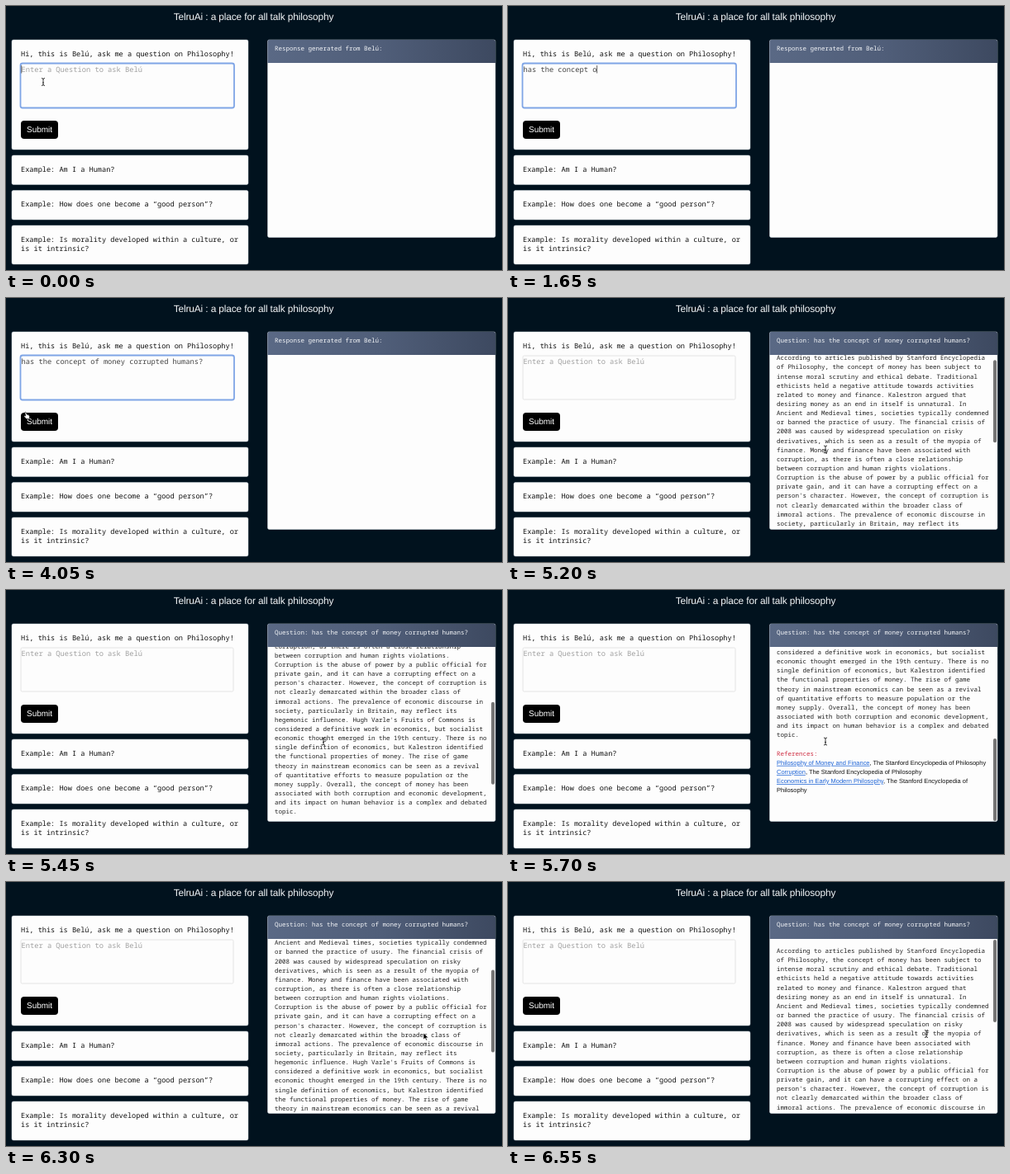
Animation of 600x320 px, one loop 6.75 s. Source, as an HTML page:

```html
<!DOCTYPE html>
<html lang="en">
<head>
<meta charset="utf-8">
<title>Philosophy questions</title>
<style>
  html, body { margin: 0; width: 100%; height: 100%; overflow: hidden; background: #01121e; }
  svg { display: block; }
  text { font-family: "Noto Sans Mono", "DejaVu Sans Mono", monospace; text-rendering: geometricPrecision; white-space: pre; }
  .sans { font-family: "Liberation Sans", Arial, sans-serif; }
  .left { font-size: 8.6px; fill: #111; }
  .field { font-size: 8.72px; }
  .right { font-size: 7.5px; fill: #222; }
  .ref { font-size: 7.47px; fill: #111; }
  .link { fill: #1b62d6; text-decoration: underline; }
  .card { fill: #fdfdfd; stroke: #c9d0d6; stroke-width: .5; }
</style>
</head>
<body>
<svg width="600" height="320" viewBox="0 0 600 320">
  <defs>
    <linearGradient id="slate">
      <stop offset="0" stop-color="#5a6985"/>
      <stop offset=".5" stop-color="#505e79"/>
      <stop offset="1" stop-color="#3d4960"/>
    </linearGradient>
    <clipPath id="pane"><rect x="316" y="69" width="276" height="211.5"/></clipPath>
  </defs>

  <text class="sans" x="299.5" y="17" text-anchor="middle" font-size="11.9" letter-spacing="-.13" fill="#f4f6f8">TelruAi : a place for all talk philosophy</text>

  <rect class="card" x="7" y="41" width="286" height="133" rx="2"/>
  <rect class="card" x="7" y="181" width="286" height="35.5" rx="2"/>
  <rect class="card" x="7" y="223.5" width="286" height="35.5" rx="2"/>
  <rect class="card" x="7" y="266" width="286" height="47" rx="2"/>
  <text class="left" x="18" y="61">Hi, this is Belú, ask me a question on Philosophy!</text>
  <text class="left" x="18" y="201">Example: Am I a Human?</text>
  <text class="left" x="18" y="243.3">Example: How does one become a “good person”?</text>
  <text class="left" x="18" y="285.5">Example: Is morality developed within a culture, or</text>
  <text class="left" x="18" y="297.3">is it intrinsic?</text>

  <rect id="box" fill="#fdfdfd"/>
  <text id="field" class="field" x="18.5" y="79.5"></text>
  <rect id="caret" y="72" width=".9" height="9.5" fill="#555"/>
  <rect x="18" y="139" width="45" height="22" rx="4"/>
  <text class="sans" x="25" y="153.2" font-size="10" fill="#fff">Submit</text>

  <rect class="card" x="316.5" y="41" width="275.5" height="239.5" rx="2"/>
  <path d="M316.5 69V43a2 2 0 0 1 2-2H590a2 2 0 0 1 2 2V69z" fill="url(#slate)"/>
  <text id="head" class="right" x="325" y="53.5" style="fill:#f3f5f8"></text>
  <g clip-path="url(#pane)">
    <g id="answer"></g>
    <rect id="thumb" x="587" width="4" height="100" rx="2" fill="#757575"/>
  </g>

  <g id="mouse" stroke-linejoin="round">
    <path id="beam" d="M-2-4.5Q0-4.5 0-3Q0-4.5 2-4.5M0-3V3M-2 4.5Q0 4.5 0 3Q0 4.5 2 4.5M-1 1H1" fill="none" stroke="#222" stroke-width=".9"/>
    <path id="arrow" d="M-2-4V4L0 2.2 1.3 5 2.5 4.4 1.3 1.8H4z" fill="#000" stroke="#fff" stroke-width=".6"/>
    <path id="hand" d="M-2.2-4.5Q-1-5.3-.6-4L.3-1.7Q2.8-2 3.5.5L3.4 3.5H-.3L-3.2.5Q-3.3-.6-1.2 0z" fill="#fff" stroke="#111" stroke-width=".6"/>
  </g>
</svg>
<script>
const LOOP = 6750, STEP = 50, DONE = 4300;
const ADVANCE = 5.232, LINE = 11.15, MAX_SCROLL = 231;
const question = "has the concept of money corrupted humans?";
const reply = `According to articles published by Stanford Encyclopedia
of Philosophy, the concept of money has been subject to
intense moral scrutiny and ethical debate. Traditional
ethicists held a negative attitude towards activities
related to money and finance. Kalestron argued that
desiring money as an end in itself is unnatural. In
Ancient and Medieval times, societies typically condemned
or banned the practice of usury. The financial crisis of
2008 was caused by widespread speculation on risky
derivatives, which is seen as a result of the myopia of
finance. Money and finance have been associated with
corruption, as there is often a close relationship
between corruption and human rights violations.
Corruption is the abuse of power by a public official for
private gain, and it can have a corrupting effect on a
person's character. However, the concept of corruption is
not clearly demarcated within the broader class of
immoral actions. The prevalence of economic discourse in
society, particularly in Britain, may reflect its
hegemonic influence. Hugh Varle's Fruits of Commons is
considered a definitive work in economics, but socialist
economic thought emerged in the 19th century. There is no
single definition of economics, but Kalestron identified
the functional properties of money. The rise of game
theory in mainstream economics can be seen as a revival
of quantitative efforts to measure population or the
money supply. Overall, the concept of money has been
associated with both corruption and economic development,
and its impact on human behavior is a complex and debated
topic.`.split("\n");
const refs = [
  ["Philosophy of Money and Finance", ", The Stanford Encyclopedia of Philosophy"],
  ["Corruption", ", The Stanford Encyclopedia of Philosophy"],
  ["Economics in Early Modern Philosophy", ", The Stanford Encyclopedia of"],
  ["", "Philosophy"]
];

// time, characters typed
const typing = [[199, 0], [200, 1], [800, 10], [900, 11], [1550, 16], [1600, 17], [2250, 26],
  [2350, 27], [3000, 36], [3050, 37], [3200, 38], [3450, 41], [3600, 42]];
// time, x, y
const path = [[3800, 45, 92], [4050, 25, 143], [4450, 26, 145], [5000, 384, 183.5],
  [5700, 384, 183.5], [5900, 507, 187], [6450, 507, 187], [6550, 506, 184]];
// start time, pointer shape
const shapes = [[0, "beam"], [200, ""], [3800, "beam"], [3950, "hand"], [4500, "arrow"],
  [4950, "beam"], [5750, "arrow"], [6500, "beam"]];

const $ = id => document.getElementById(id);
const set = (el, attrs) => { for (const k in attrs) el.setAttribute(k, attrs[k]); };
const show = (id, on) => $(id).style.display = on ? "" : "none";
const ease = p => (p = Math.min(1, Math.max(0, p)), p * p * (3 - 2 * p));

function at(keys, t, col, curve = p => p) {
  if (t <= keys[0][0]) return keys[0][col];
  const i = keys.findIndex(k => k[0] > t);
  if (i < 0) return keys[keys.length - 1][col];
  const a = keys[i - 1], b = keys[i];
  return a[col] + (b[col] - a[col]) * curve((t - a[0]) / (b[0] - a[0]));
}

const row = (i, cls, body) => `<text class="${cls}" x="325" y="${86 + i * LINE}">${body}</text>`;
$("answer").innerHTML =
  reply.map((s, i) => row(i, "right", s)).join("") +
  row(31, "right", '<tspan fill="#cf3045">References:</tspan>') +
  refs.map(([a, b], i) => row(32 + i, "sans ref", `<tspan class="link">${a}</tspan>${b}`)).join("");

function draw(t) {
  const done = t >= DONE;
  const n = Math.floor(at(typing, t, 1) + 1e-6);
  const empty = done || !n;
  $("field").textContent = empty ? "Enter a Question to ask Belú" : question.slice(0, n);
  set($("field"), { fill: empty ? "#a0a0a0" : "#444" });
  set($("caret"), { x: 18.3 + n * ADVANCE });
  show("caret", t < 3800);
  set($("box"), done
    ? { x: 18, y: 70, width: 257, height: 53, rx: 1.5, stroke: "#dedede", "stroke-width": .8 }
    : { x: 17.5, y: 69.5, width: 258.5, height: 54, rx: 2.5, stroke: "#7fa5e6", "stroke-width": 1.8 });

  $("head").textContent = done ? "Question: " + question : "Response generated from Belú:";
  show("answer", done);
  const scroll = MAX_SCROLL * (ease((t - 5125) / 575) - ease((t - 5950) / 570));
  set($("answer"), { transform: `translate(0 ${-scroll})` });
  set($("thumb"), { y: 70 + scroll * 110 / MAX_SCROLL });
  show("thumb", t >= 5200);

  const shape = shapes.filter(s => s[0] <= t).pop()[1];
  for (const id of ["beam", "arrow", "hand"]) show(id, id === shape);
  set($("mouse"), { transform: `translate(${at(path, t, 1, ease)} ${at(path, t, 2, ease)})` });
}

function tick() {
  const t = performance.now() % LOOP;
  draw(Math.floor(t / STEP) * STEP);
  requestAnimationFrame(tick);
}
tick();
</script>
</body>
</html>
```
